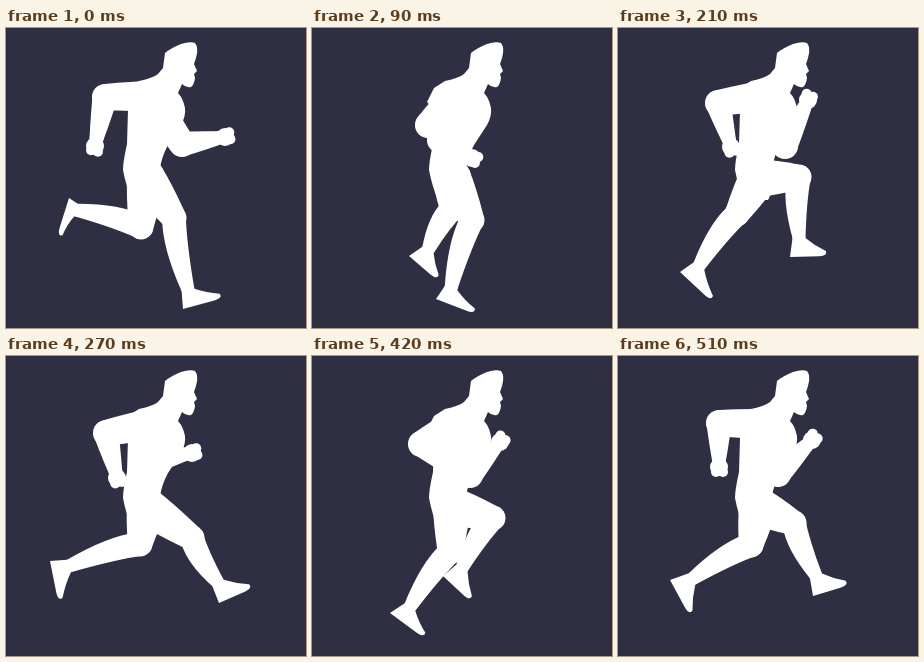
Write an HTML page with a canvas that moves like this. It is 300 by 300 pixels and loops after 540 ms.

```html
<!DOCTYPE html>
<html lang="en">
<head>
<meta charset="utf-8">
<title>Runner</title>
<style>
  html, body { margin: 0; width: 100%; height: 100%; overflow: hidden; background: #2e2f42; }
  canvas { display: block; width: 300px; height: 300px; }
</style>
</head>
<body>
<canvas id="stage"></canvas>
<script>
const LOOP = 540, STEP = 30;
const HIP = [140, 150], SHOULDER = [144, 68];

// Times at which the stride passes each leg pose.
const TIMES = [0, 40, 90, 150, 210, 240, 270, 300, 330, 375, 420, 480, 510, 540];

// Stride poses: knee, ankle, heel, toe. The other leg is half a ring ahead.
const LEG = [
  [135, 199, 70, 182, 63, 170, 51, 208],
  [138, 182, 86, 198, 69, 197, 81, 232],
  [140, 181, 116, 222, 97, 228, 125, 252],
  [181, 162, 150, 212, 131, 220, 158, 245],
  [181, 149, 181, 210, 172, 229, 210, 228],
  [176, 167, 198, 220, 195, 240, 231, 229],
  [186, 182, 212, 227, 213, 247, 247, 232],
  [168, 190, 182, 262, 177, 281, 217, 270],
  [162, 192, 154, 258, 144, 275, 185, 279],
  [160, 192, 139, 260, 124, 271, 163, 286],
  [138, 196, 98, 251, 78, 257, 112, 282],
  [119, 186, 81, 238, 62, 244, 93, 273],
  [133, 189, 74, 223, 52, 224, 71, 259],
  [134, 188, 63, 210, 44, 205, 52, 245]
];

// Arm poses: elbow, fist. One for every second leg pose.
const ARM_A = [
  [99, 69, 89, 118], [128, 112, 160, 130], [167, 118, 190, 72], [152, 103, 186, 97],
  [145, 124, 177, 131], [109, 88, 132, 111], [101, 67, 101, 111]
];
const ARM_B = [
  [176, 116, 219, 109], [116, 97, 134, 114], [100, 75, 113, 119], [100, 77, 111, 122],
  [117, 84, 134, 112], [158, 119, 188, 86], [160, 118, 194, 84]
];

const BODY = new Path2D(`M159 25 Q165 20 175 16 Q184 13 189 15 Q193 20 190 30
  L188 36 L191 43 L188 46 L189 50 Q188 57 185 59 Q180 60 176 56 L172 65
  Q177 70 179 80 Q180 88 175 97 L162 117 Q156 128 154 140 L160 152 L150 172 L140 172
  L126 172 Q120 158 117 142 Q117 134 121 116 L122 82 L115 74 L122 60 L133 53
  Q147 50 152 46 L157 40 Z`);

const canvas = document.getElementById('stage');
const ctx = canvas.getContext('2d');
const dpr = window.devicePixelRatio || 1;
canvas.width = canvas.height = 300 * dpr;
ctx.scale(dpr, dpr);

const mix = (a, b, k) => [a[0] + (b[0] - a[0]) * k, a[1] + (b[1] - a[1]) * k];
const add = (p, d, k) => [p[0] + d[0] * k, p[1] + d[1] * k];

function axis(a, b) {
  const dx = b[0] - a[0], dy = b[1] - a[1], len = Math.hypot(dx, dy) || 1;
  return [dx / len, dy / len];
}

const normal = d => [d[1], -d[0]];

// Closed Catmull-Rom curve through a ring of poses, returned as points.
function pose(ring, at) {
  const n = ring.length, i = Math.floor(at), k = at - i;
  const [a, b, c, d] = [-1, 0, 1, 2].map(o => ring[(i + o + n) % n]);
  const v = b.map((_, j) => b[j] + 0.5 * k * (c[j] - a[j] +
    k * (2 * a[j] - 5 * b[j] + 4 * c[j] - d[j] + k * (3 * (b[j] - c[j]) + d[j] - a[j]))));
  const points = [];
  for (let j = 0; j < v.length; j += 2) points.push([v[j], v[j + 1]]);
  return points;
}

function disc(p, r) {
  ctx.beginPath();
  ctx.arc(p[0], p[1], r, 0, Math.PI * 2);
  ctx.fill();
}

// Tapered segment with round ends; front and back set the curve of each side.
function limb(a, b, ra, rb, front, back) {
  const n = normal(axis(a, b)), m = mix(a, b, 0.38);
  ctx.beginPath();
  ctx.moveTo(...add(a, n, ra));
  ctx.quadraticCurveTo(...add(m, n, front), ...add(b, n, rb));
  ctx.lineTo(...add(b, n, -rb));
  ctx.quadraticCurveTo(...add(m, n, -back), ...add(a, n, -ra));
  ctx.fill();
  disc(a, ra);
  disc(b, rb);
}

function foot(knee, ankle, heel, toe) {
  const n = normal(axis(knee, ankle)), u = axis(heel, toe), v = normal(u);
  const front = add(ankle, n, 6.5);
  const tip = add(add(toe, v, 5), u, -2);
  ctx.beginPath();
  ctx.moveTo(...add(ankle, n, -6.5));
  ctx.lineTo(...heel);
  ctx.lineTo(...add(toe, u, -9));
  ctx.quadraticCurveTo(...toe, ...tip);
  ctx.quadraticCurveTo(...add(mix(front, tip, 0.45), v, -2), ...front);
  ctx.fill();
}

function leg(at) {
  const [knee, ankle, heel, toe] = pose(LEG, at);
  limb(HIP, knee, 19, 12.5, 18, 18);
  limb(knee, ankle, 12, 6.5, 7.5, 17);
  foot(knee, ankle, heel, toe);
}

function arm(ring, at) {
  const [elbow, fist] = pose(ring, at);
  const d = axis(elbow, fist), n = normal(d);
  limb(SHOULDER, elbow, 15, 13, 15, 15);
  limb(elbow, add(fist, d, -7), 12.5, 7, 11, 11);
  disc(fist, 9);
  disc(add(add(fist, d, 5), n, 4), 5);
  disc(add(add(fist, d, 5), n, -3), 5);
}

function stride(t) {
  let i = 0;
  while (TIMES[i + 1] <= t) i++;
  return i + (t - TIMES[i]) / (TIMES[i + 1] - TIMES[i]);
}

function draw(now) {
  const p = stride(Math.floor(now % LOOP / STEP) * STEP);
  ctx.fillStyle = '#2e2f42';
  ctx.fillRect(0, 0, 300, 300);
  ctx.fillStyle = '#fff';
  ctx.fill(BODY);
  leg(p);
  leg((p + 7) % LEG.length);
  arm(ARM_A, p / 2);
  arm(ARM_B, p / 2);
}

const start = performance.now();
function tick() {
  draw(performance.now() - start);
  requestAnimationFrame(tick);
}
tick();
</script>
</body>
</html>
```
